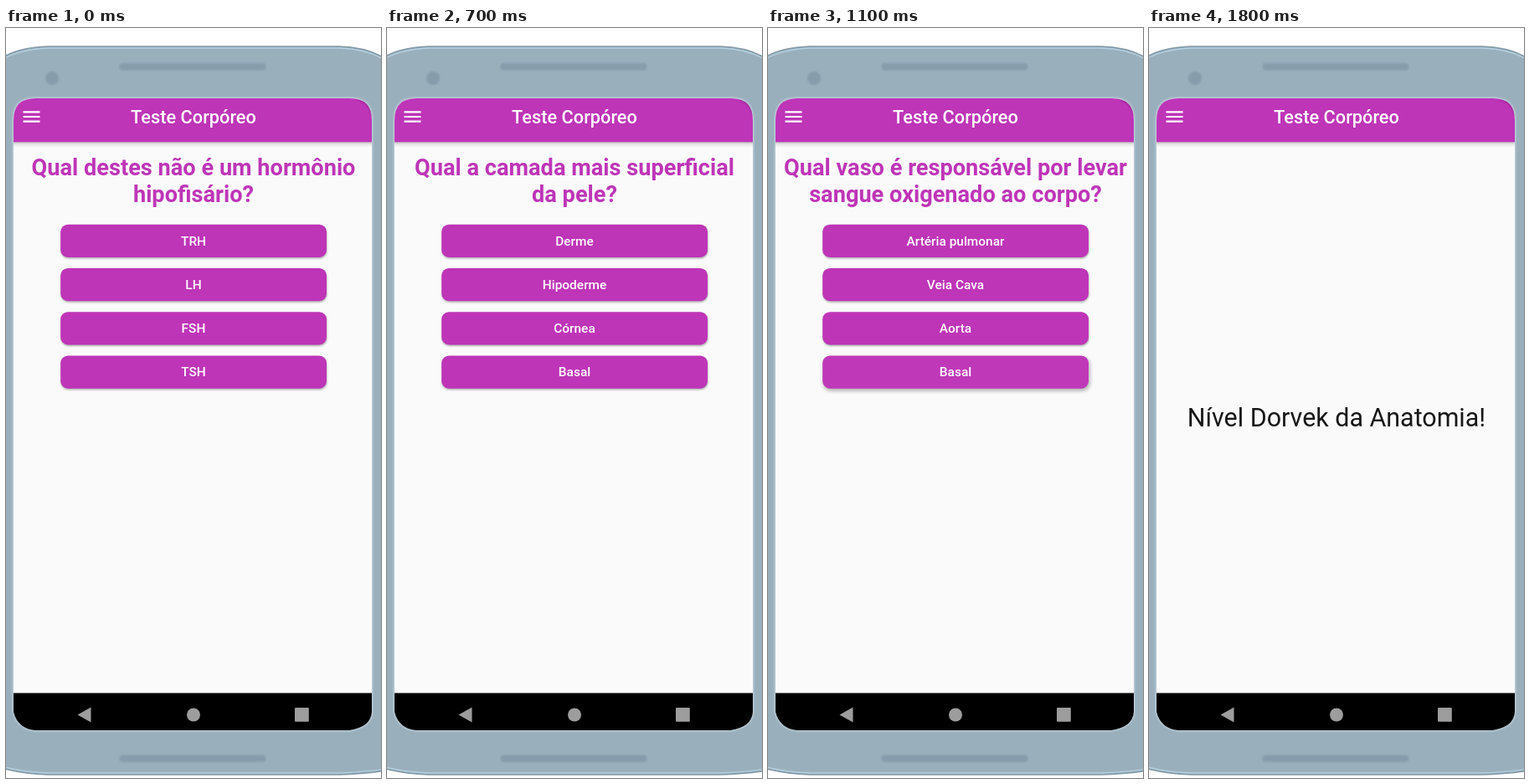
Write an HTML page that moves like this. It is 448 px wide and 896 px high and loops after 3300 ms.

```html
<!DOCTYPE html>
<html lang="pt">
<head>
<meta charset="utf-8">
<title>Teste Corpóreo</title>
<style>
html, body { margin: 0; width: 100%; height: 100%; overflow: hidden; background: #fff; }
svg { display: block; width: 100vw; height: 100vh; }
text { font-family: Roboto, sans-serif; text-anchor: middle; }
.title { font-size: 21.74px; font-weight: 500; fill: #fff; }
.ask { font-size: 27.17px; font-weight: 700; fill: #be35b7; }
.label { font-size: 15.45px; font-weight: 500; fill: #fff; }
.result { font-size: 30.43px; fill: #171717; }
</style>
</head>
<body>
<svg viewBox="0 0 448 896">
  <defs>
    <clipPath id="screen"><path d="M9 110Q9 84 35 84H411Q437 84 437 110V817Q436 835 410 839H35Q14 837 9 817Z"/></clipPath>
    <filter id="soft" x="-10%" y="-10%" width="120%" height="120%"><feGaussianBlur stdDeviation="0.8"/></filter>
    <linearGradient id="barShade" x2="0" y2="1">
      <stop offset="0" stop-color="#000" stop-opacity=".24"/>
      <stop offset=".45" stop-color="#000" stop-opacity=".07"/>
      <stop offset="1" stop-color="#000" stop-opacity="0"/>
    </linearGradient>
  </defs>

  <path d="M-6 37Q10 24 50 22H398Q432 23 454 37V887Q430 891 398 892H50Q20 891 -6 884Z" fill="#9aafbc" stroke="#8298a5" stroke-width="1.5"/>
  <path d="M-6 39Q12 26 50 24H398Q432 25 454 39M-6 882Q20 889 50 890H398Q430 889 454 885" fill="none" stroke="#b4d0df" stroke-width="1.3"/>
  <g fill="#869caa" filter="url(#soft)">
    <rect x="135.5" y="42" width="175" height="8.5" rx="4"/>
    <rect x="135.5" y="868.5" width="175" height="8.5" rx="4"/>
    <circle cx="55" cy="60" r="8"/>
  </g>

  <path d="M9 110Q9 84 35 84H411Q437 84 437 110V817Q436 835 410 839H35Q14 837 9 817Z" fill="#fafafa" stroke="#bccfda" stroke-width="2.4" filter="url(#soft)"/>
  <g clip-path="url(#screen)">
    <rect x="9" y="84" width="428" height="711" fill="#fafafa"/>
    <rect x="9" y="136" width="428" height="7" fill="url(#barShade)"/>
    <rect x="9" y="83" width="428" height="53.3" fill="#be35b7"/>
    <path d="M417 85Q432 88 437 105V84Z" fill="#86207f" opacity=".6" filter="url(#soft)"/>
    <path d="M20.5 100.4H40.5M20.5 106H40.5M20.5 111.6H40.5" stroke="#fff" stroke-width="2.2"/>
    <text class="title" x="224" y="114">Teste Corpóreo</text>
    <g id="quiz">
      <text class="ask" x="224" y="176"></text>
      <text class="ask" x="224" y="207.6"></text>
      <g id="buttons"></g>
    </g>
    <text id="result" class="result" x="224" y="475.6">Nível Dorvek da Anatomia!</text>
    <rect x="9" y="794.5" width="428" height="46" fill="#000"/>
    <g fill="#9d9d9d">
      <path d="M85.5 820.5L101.5 811.5V829.5Z"/>
      <circle cx="224" cy="820.5" r="8"/>
      <rect x="345" y="812" width="16.8" height="16.8" rx="1"/>
    </g>
  </g>
</svg>
<script>
const LOOP = 3300, STEP = 100, RESULT_AT = 1800;
const questions = [
  { at: 0, ask: ["Qual destes não é um hormônio", "hipofisário?"],
    options: ["TRH", "LH", "FSH", "TSH"] },
  { at: 300, ask: ["Qual a camada mais superficial", "da pele?"],
    options: ["Derme", "Hipoderme", "Córnea", "Basal"] },
  { at: 900, ask: ["Qual vaso é responsável por levar", "sangue oxigenado ao corpo?"],
    options: ["Artéria pulmonar", "Veia Cava", "Aorta", "Basal"] }
];
const taps = [
  { button: 0, x: 224, y: 254, down: 300, up: 300 },
  { button: 3, x: 208.5, y: 428, down: 700, up: 890.5 },
  { button: 0, x: 246, y: 247.5, down: 1600, up: 1800 }
];

const clamp = v => Math.max(0, Math.min(1, v));
const set = (node, attrs) => {
  for (const k in attrs) node.setAttribute(k, attrs[k]);
  return node;
};
const add = (parent, tag, attrs) =>
  parent.appendChild(set(document.createElementNS("http://www.w3.org/2000/svg", tag), attrs));
const byId = id => document.getElementById(id);

const defs = document.querySelector("defs");
const asks = document.querySelectorAll(".ask");

const buttons = [0, 1, 2, 3].map(i => {
  const y = 234.8 + i * 52.25;
  const box = { x: 65.2, y, width: 317.8, height: 39.1, rx: 8.7 };
  add(add(defs, "clipPath", { id: "clip" + i }), "rect", box);
  const filter = add(defs, "filter", { id: "shade" + i, x: "-10%", y: "-60%", width: "120%", height: "220%" });
  const blur = add(filter, "feGaussianBlur", { stdDeviation: 1.3 });
  const g = add(byId("buttons"), "g", {});
  const shadow = add(g, "rect", { ...box, filter: `url(#shade${i})` });
  add(g, "rect", { ...box, fill: "#be35b7" });
  const glow = add(g, "rect", { ...box, fill: "#fff" });
  const clipped = add(g, "g", { "clip-path": `url(#clip${i})` });
  const ripple = add(clipped, "circle", { fill: "#fff" });
  const label = add(g, "text", { class: "label", x: 224, y: y + 24.9 });
  return { blur, shadow, glow, ripple, label };
});

function pressState(tap, t) {
  const rise = clamp((t - tap.down) / 100);
  const after = Math.max(0, t - tap.up);
  return {
    x: tap.x, y: tap.y,
    r: 0.14 * (Math.min(t, tap.up) - tap.down) + 1.087 * after,
    fade: clamp(1 - after / 200),
    glow: Math.min(rise, clamp(1 - after / 250)),
    lift: Math.min(rise, clamp(1 - after / 400))
  };
}

function drawButton(b, p) {
  set(b.blur, { stdDeviation: 1.3 + 2.4 * p.lift });
  set(b.shadow, {
    transform: `translate(${0.4 + 1.6 * p.lift} ${1.5 + 2.5 * p.lift})`,
    opacity: 0.3 + 0.05 * p.lift
  });
  set(b.glow, { opacity: 0.09 * p.glow });
  set(b.ripple, { cx: p.x, cy: p.y, r: Math.max(0, p.r), opacity: 0.12 * p.fade });
}

const idle = { x: 0, y: 0, r: 0, fade: 0, glow: 0, lift: 0 };

function draw(time) {
  const t = Math.floor((time % LOOP) / STEP) * STEP;
  const done = t >= RESULT_AT;
  byId("quiz").style.display = done ? "none" : "";
  byId("result").style.display = done ? "" : "none";
  if (done) return;
  const q = questions.filter(item => item.at <= t).pop();
  asks.forEach((node, i) => { node.textContent = q.ask[i]; });
  const tap = taps.filter(item => item.down <= t).pop();
  buttons.forEach((b, i) => {
    b.label.textContent = q.options[i];
    drawButton(b, tap && tap.button === i ? pressState(tap, t) : idle);
  });
}

const start = performance.now();
function tick() {
  draw(performance.now() - start);
  requestAnimationFrame(tick);
}
tick();
</script>
</body>
</html>
```
